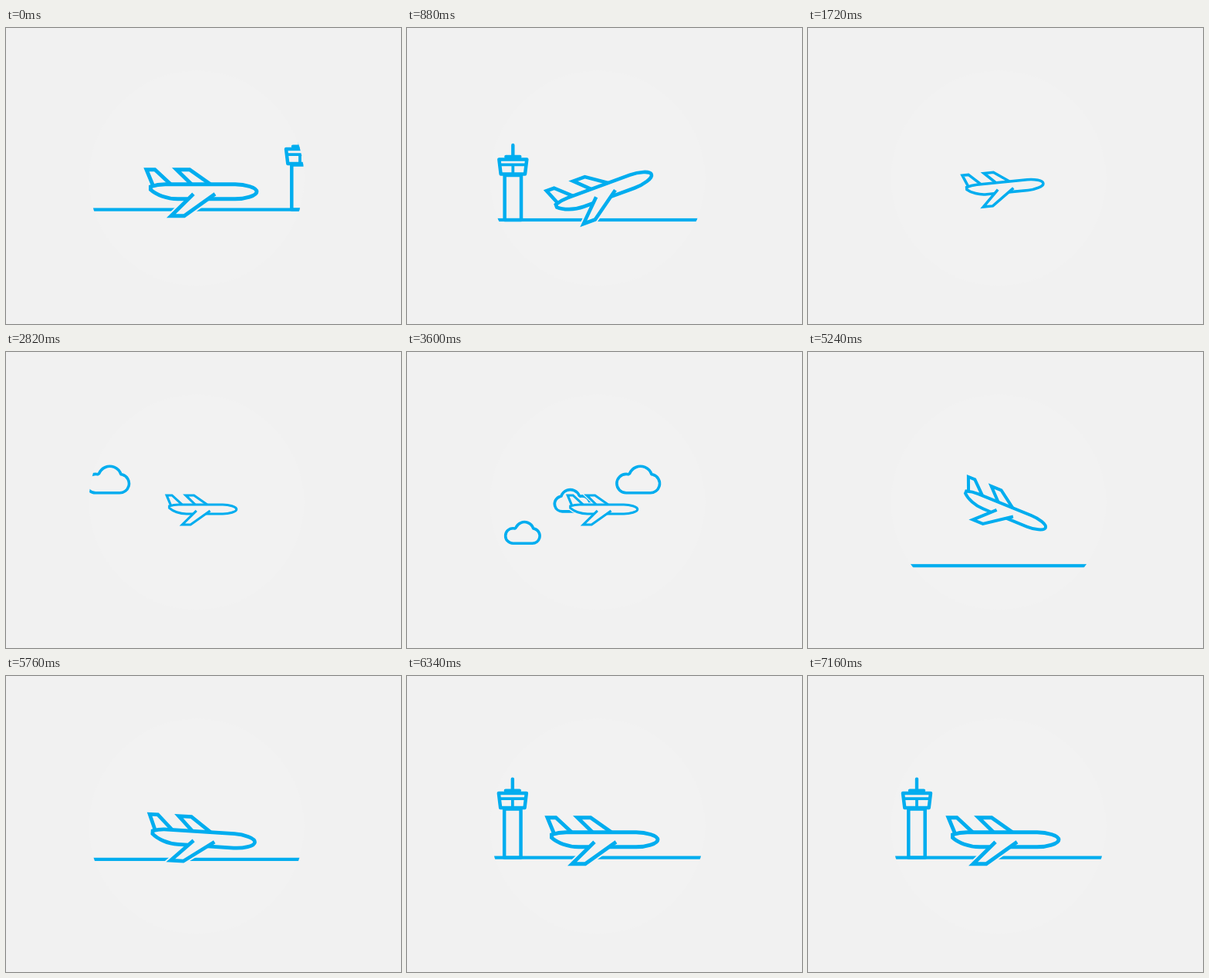
An HTML page with a canvas for the animation above (7180 ms loop, 512 by 384 pixels).

```html
<!DOCTYPE html>
<html lang="en">
<head>
<meta charset="utf-8">
<title>Flight</title>
<style>
html, body { margin: 0; width: 100%; height: 100%; overflow: hidden; background: #f1f1f1; }
canvas { display: block; }
</style>
</head>
<body>
<canvas id="stage" width="512" height="384"></canvas>
<script>
const ctx = document.getElementById('stage').getContext('2d');
const LOOP = 7180, BLUE = '#00adef', BACK = '#f1f1f1', PORT = '#f2f2f2';
const CLOUD_SPEED = 0.4, CLOUD_PERIOD = 1200;

const clamp = v => Math.min(1, Math.max(0, v));
const ramp = (t, from, to) => clamp((t - from) / (to - from));
const smooth = (t, from, to) => {
  const u = ramp(t, from, to);
  return u * u * (3 - 2 * u);
};
// Rises quickly and falls slowly between two times.
const bump = (t, from, to) => Math.max(0, Math.sin(Math.PI * ramp(t, from, to) ** 0.7)) ** 1.5;
// Runs from 1 to 0, passing a little below 0 on the way.
const backOut = (t, from, to, pull) => {
  const p = 1 - ramp(t, from, to);
  return p * p * ((pull + 1) * p - pull);
};

// 1 while cruising, 0 while on the runway.
const height = t => smooth(t, 400, 2350) - smooth(t, 4380, 6070);
const pitch = t => 27 * bump(t, 4365, 5950) - 22 * bump(t, 480, 2000);
const groundDrop = t => smooth(t, 520, 1520) - smooth(t, 5117, 5862);
const groundY = t => 235.6 + 45 * groundDrop(t);
const leavingTowerX = t => 381 - 301 * ramp(t, 320, 980) ** 1.3;
const arrivingTowerX = t => 141 + 270 * backOut(t, 5918, 6672, 0.925);

// Each cloud crosses twice; `start` is when it first enters on the right.
const clouds = [
  { start: 2115, base: 182.8, size: 1, flip: 1 },
  { start: 3097, base: 206.9, size: .82, flip: -1 },
  { start: 1740, base: 248.2, size: .8, flip: 1 }
];

// Plane parts, relative to its centre.
const fins = new Path2D('M-63 -8L-71.5 -28.5H-60.5L-40 -9.5M-13 -9.5L-32.5 -28.5H-15.5L11.5 -9.5');
const body = new Path2D('M-18 9.5H-31C-45 9.5 -59 4 -66 -2.5V-6.5Q-57 -9.5 -47 -9.5H43.5C56 -9.5 71.5 -5.5 71.5 0C71.5 5.5 56 9.5 43.5 9.5H8.5');
const wing = new Path2D('M-10.5 3L-39.5 31.5H-22.5L17.5 3');
const planeParts = [fins, body, wing];

// Tower parts, relative to the foot of the tower.
const cabin = new Path2D('M-18 -83.5H18L15.7 -64.5H-15.7Z');
const windows = new Path2D('M-16.5 -76.5H16.5M0 -76.5V-64.5');
const roof = new Path2D('M-9 -87H9M0 -89V-102');

function outline(path, width) {
  ctx.lineWidth = width;
  ctx.stroke(path);
}

function drawPlane(t) {
  const air = height(t), angle = pitch(t), scale = 1 - 0.367 * air;
  ctx.save();
  ctx.translate(253.5, 212.3 - 8.3 * air - 0.11 * angle);
  ctx.rotate(angle * Math.PI / 180);
  ctx.scale(scale, scale);
  // A clear margin keeps scenery away from the outline.
  ctx.fillStyle = ctx.strokeStyle = PORT;
  for (const part of planeParts) {
    ctx.fill(part);
    outline(part, 8.7);
  }
  ctx.strokeStyle = BLUE;
  for (const part of planeParts) outline(part, 4.9);
  ctx.restore();
}

function drawCloud(x, base, size, flip) {
  ctx.save();
  ctx.translate(x, base);
  ctx.scale(size * flip, size);
  ctx.lineWidth = 3.6 / size;
  ctx.lineJoin = 'round';
  ctx.beginPath();
  ctx.arc(-16.5, -12.2, 12.2, Math.PI / 2, 4.95);
  ctx.arc(2, -19.3, 15.2, 3.53, 5.96);
  ctx.arc(14.8, -12.1, 12.1, 4.99, Math.PI * 2.5);
  ctx.closePath();
  ctx.stroke();
  ctx.restore();
}

function drawTower(x, base, lowered) {
  const top = lowered - 63;
  ctx.save();
  ctx.translate(x, base);
  ctx.lineJoin = 'round';
  ctx.lineWidth = 4.5;
  ctx.fillStyle = PORT;
  ctx.fillRect(-10.7, top, 21.4, -top);
  ctx.strokeRect(-10.7, top, 21.4, -top);
  ctx.translate(0, lowered);
  ctx.fill(cabin);
  outline(cabin, 4.5);
  outline(windows, 3.8);
  ctx.lineCap = 'round';
  outline(roof, 4.4);
  ctx.restore();
}

function drawGround(t) {
  ctx.globalAlpha = clamp((1 - groundDrop(t)) * 20);
  ctx.fillStyle = BLUE;
  ctx.fillRect(100, groundY(t) - 2.1, 300, 4.2);
  ctx.globalAlpha = 1;
}

function draw(t) {
  ctx.fillStyle = BACK;
  ctx.fillRect(0, 0, 512, 384);
  ctx.save();
  ctx.beginPath();
  ctx.arc(247, 195, 139.5, 0, Math.PI * 2);
  ctx.fillStyle = PORT;
  ctx.fill();
  ctx.clip();
  ctx.strokeStyle = BLUE;

  drawGround(t);
  if (t < 980) drawTower(leavingTowerX(t), groundY(t), 5);
  if (t > 5918) drawTower(arrivingTowerX(t), groundY(t), 0);
  for (const { start, base, size, flip } of clouds) {
    for (const pass of [0, 1]) {
      const x = 415 - CLOUD_SPEED * (t - start - pass * CLOUD_PERIOD);
      if (x > 60 && x < 430) drawCloud(x, base, size, flip);
    }
  }
  drawPlane(t);
  ctx.restore();
}

const begin = performance.now();
function tick() {
  draw((performance.now() - begin) % LOOP);
  requestAnimationFrame(tick);
}
tick();
</script>
</body>
</html>
```
